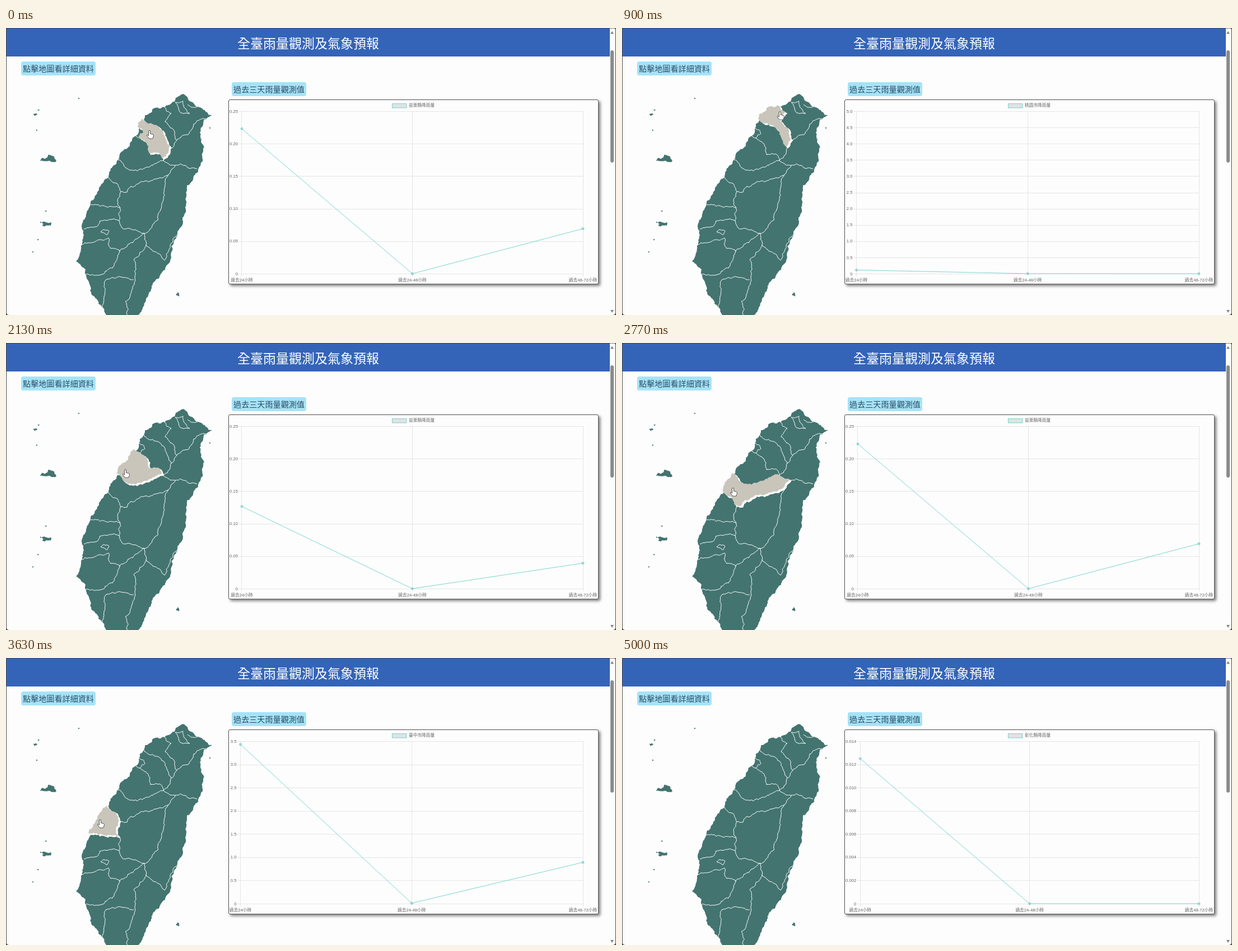
These frames come from a looping animation (1089 by 514 pixels, 5.03 s). An HTML page with a canvas:

```html
<!DOCTYPE html>
<html lang="zh-Hant">
<head>
<meta charset="utf-8">
<title>雨量觀測</title>
<style>
  html, body { margin: 0; width: 100%; height: 100%; overflow: hidden; background: #fdfdfd; }
  body { position: relative; font-family: "Noto Sans CJK TC", "Noto Sans CJK", sans-serif; font-weight: 300; }
  canvas, h1, .tag, .card, .thumb, .frame { position: absolute; box-sizing: border-box; margin: 0; }
  canvas { left: 0; top: 0; width: 1089px; height: 514px; }
  h1 { left: 1px; top: 0; width: 1077px; height: 51px; background: #3464b8; color: #fff;
       font-size: 23px; line-height: 52px; font-weight: 300; text-align: center; }
  .tag { width: 133px; height: 25px; border-radius: 4px; background: #a6e3f7; color: #2b4c66;
         font-size: 14.1px; line-height: 25px; text-align: center; white-space: nowrap; }
  .card { left: 396.5px; top: 128px; width: 661px; height: 331px; background: #fdfdfd;
          border: 1px solid #555; border-radius: 3px; box-shadow: 3px 3px 5px rgba(0, 0, 0, .5); }
  .thumb { left: 1079px; top: 40px; width: 6px; height: 201px; border-radius: 3px; background: #8b8b8b; }
  .frame { left: 0; top: 0; width: 1089px; height: 514px; border: 1px solid #4a4a4a; border-bottom: 0;
           border-top-color: rgba(50, 50, 60, .6); border-radius: 4px 4px 5px 5px; box-shadow: 0 0 0 6px #3a3a3a; }
</style>
</head>
<body>
<h1>全臺雨量觀測及氣象預報</h1>
<div class="tag" style="left:27px;top:60px">點擊地圖看詳細資料</div>
<div class="tag" style="left:403px;top:97px">過去三天雨量觀測值</div>
<div class="card"></div>
<div class="thumb"></div>
<canvas></canvas>
<div class="frame"></div>
<script>
const LOOP = 5030, WIDTH = 1089, HEIGHT = 514;
const GREEN = '#437470', TAN = '#c9c5ba', TEAL = '#7bd3ce', PAPER = '#fdfdfd';
const canvas = document.querySelector('canvas');
const ctx = canvas.getContext('2d');
const scale = window.devicePixelRatio || 1;
canvas.width = WIDTH * scale;
canvas.height = HEIGHT * scale;

// Key points of each shoreline and border; wobble() adds the fine detail
const arcs = {
  mainCoast: '283,142 294,136 303,125 316,118 330,132 345,142 369,157 353,165 346,187 354,213 351,235 336,264 323,282 322,300 315,342 306,371 288,424 264,455 236,514 220,540 196,530 172,500 150,470 142,433 125,418 138,374 136,350 150,317',
  changhuaCoast: '150,317 166,290 183,267',
  taichungCoast: '183,267 184,259 200,236',
  miaoliCoast: '200,236 207,221 223,204 231,193',
  cityCoast: '231,193 238,179',
  hsinchuCoast: '238,179 239,172 246,165',
  taoyuanCoast: '246,165 248,156 266,143 283,142',
  taoyuanEast: '283,142 295,153 284,168 298,181 305,201 295,215',
  taoyuanSouth: '246,165 267,176 286,195 295,215',
  hsinchuEast: '295,215 293,225 281,237',
  miaoliNorth: '281,237 275,226 258,227 257,214 239,197',
  cityEast: '239,197 248,189 238,179',
  citySouth: '231,193 239,197',
  taichungNorth: '200,236 215,251 234,256 262,246 281,237',
  taichungEast: '281,237 290,243 302,246 290,263',
  taichungSouth: '290,263 249,274 222,284 216,294 205,293',
  taichungWest: '183,267 199,279 205,293',
  changhuaEast: '205,293 199,310 204,322',
  changhuaSouth: '204,322 175,318 150,317',
  taipei: '302,133 312,152 328,153 316,131 302,133',
  keelung: '324,137 331,142 343,141',
  yilanNorth: '362,161 335,172 325,191 305,201',
  yilanSouth: '302,246 320,246 341,252',
  nantouEast: '290,263 282,290 276,325 271,344 247,368',
  nantouWest: '204,322 202,345 212,360 247,368',
  yunlinSouth: '139,360 161,356 167,346 202,345',
  chiayiCity: '169,365 175,361 184,364 181,370 169,365',
  chiayiSouth: '135,388 160,382 183,376 187,395 203,400 218,387 247,368',
  tainanSouth: '203,400 190,430 175,440 142,441',
  taitungWest: '247,368 250,388 228,415 229,457 213,490 218,520',
  taitungNorth: '250,388 283,416 292,395 306,371',
  pingtungNorth: '228,451 210,447 180,450 175,480 172,500',
};
for (const name in arcs) arcs[name] = arcs[name].split(' ').map(pair => pair.split(',').map(Number));

// Shapes are arcs joined end to end; a minus sign reverses one
const counties = {
  taoyuan: join('taoyuanCoast taoyuanEast -taoyuanSouth'),
  hsinchu: join('hsinchuCoast taoyuanSouth hsinchuEast miaoliNorth cityEast'),
  miaoli: join('miaoliCoast citySouth -miaoliNorth -taichungNorth'),
  taichung: join('taichungCoast taichungNorth taichungEast taichungSouth -taichungWest'),
  changhua: join('changhuaCoast taichungWest changhuaEast changhuaSouth'),
};
const land = join('mainCoast changhuaCoast taichungCoast miaoliCoast cityCoast hsinchuCoast taoyuanCoast');
const borders = Object.keys(arcs).filter(name => !name.endsWith('Coast')).map(join);

const islets = [islet(80, 234, 10, 6), islet(67, 236, 6, 3), islet(72, 351, 8, 4), islet(307, 477, 3, 3), islet(52, 155, 3, 2),
  ...'130,126 58,147 55,183 71,328 62,348 57,379 48,401 364,179'.split(' ').map(p => islet(...p.split(',').map(Number), 1.5, 1))];

const charts = [
  { start: -1000, name: '苗栗縣', values: [.223, 0, .0692] },
  { start: 895, name: '桃園市', values: [4.73, .035, 0] },
  { start: 1942, name: '苗栗縣', values: [.223, 0, .0692] },
  { start: 2900, name: '臺中市', values: [3.45, .01, .895] },
  { start: 3930, name: '彰化縣', values: [.0125, 0, 0] },
];
const dayLabels = ['過去24小時', '過去24-48小時', '過去48-72小時'];

const visits = [
  { time: 0, x: 256, y: 184, county: 'hsinchu' },
  { time: 880, x: 282, y: 150, county: 'taoyuan' },
  { time: 1570, x: 237, y: 216, county: 'miaoli' },
  { time: 2130, x: 213, y: 227, county: 'miaoli' },
  { time: 2770, x: 198, y: 260, county: 'taichung' },
  { time: 3630, x: 168, y: 290, county: 'changhua' },
  { time: 4300, x: 168, y: 290, county: 'changhua' },
  { time: 4700, x: 150, y: -20 },
];
const hand = new Path2D('M-1.5 9V1a1.5 1.5 0 0 1 3 0v4.3l4.6 1.1q1.6.5 1.4 2.1l-.8 3.5-1 2.2H-.3L-4.6 9q-.4-1.8 1.3-1.4z');

// Fractal wobble that is the same in both directions, so shared edges coincide
function wobble(path, a, b) {
  const dx = b[0] - a[0], dy = b[1] - a[1], length = Math.hypot(dx, dy);
  if (length > 3) {
    const noise = Math.sin((a[0] + b[0]) * 12.9 + (a[1] + b[1]) * 78.2) * 43758;
    const bend = (noise - Math.floor(noise) - .5) * Math.min(.36, 6 / length) * ((dx || dy) > 0 ? 1 : -1);
    const mid = [(a[0] + b[0]) / 2 - dy * bend, (a[1] + b[1]) / 2 + dx * bend];
    wobble(path, a, mid);
    wobble(path, mid, b);
  } else path.lineTo(...b);
}

function trace(points) {
  const path = new Path2D();
  path.moveTo(...points[0]);
  points.slice(1).forEach((point, i) => wobble(path, points[i], point));
  return path;
}

function join(names) {
  return trace(names.split(' ').flatMap(name =>
    name[0] === '-' ? [...arcs[name.slice(1)]].reverse() : arcs[name]));
}

function islet(x, y, rx, ry) {
  const corners = Array.from({ length: 10 }, (_, i) => {
    const angle = i * Math.PI / 5, reach = 1 + .35 * Math.sin(i * 4.1 + x);
    return [x + rx * reach * Math.cos(angle), y + ry * reach * Math.sin(angle)];
  });
  return trace([...corners, corners[0]]);
}

function fill(path, color) {
  ctx.fillStyle = color;
  ctx.fill(path);
}

function line(x1, y1, x2, y2) {
  ctx.beginPath();
  ctx.moveTo(x1, y1);
  ctx.lineTo(x2, y2);
  ctx.stroke();
}

function label(text, x, y, align) {
  ctx.textAlign = align;
  ctx.fillText(text, x, y);
}

function drawMap(hovered) {
  [land, ...islets].forEach(path => fill(path, GREEN));
  ctx.strokeStyle = '#fff';
  ctx.lineWidth = 1;
  borders.forEach(path => ctx.stroke(path));
  if (!hovered) return;
  fill(counties[hovered], PAPER);
  ctx.save();
  ctx.translate(-3, -2.5);
  fill(counties[hovered], TAN);
  ctx.restore();
}

// Round tick spacing: 1, 2, 5 or 10 times a power of ten, at most ten ticks
function tickStep(max) {
  const power = 10 ** Math.floor(Math.log10(max / 10));
  return [1, 2, 5, 10].find(n => n * power >= max / 10) * power;
}

function drawChart(t) {
  const { start, name, values } = charts.filter(chart => chart.start <= t).pop();
  const peak = Math.max(...values), step = tickStep(peak), ticks = Math.ceil(peak / step);
  const digits = -Math.floor(Math.log10(step) + 1e-9);
  const grown = 1 - (1 - Math.min(1, (t - start) / 1000)) ** 4;

  ctx.font = '7.7px "Liberation Sans", "Noto Sans CJK TC", "Noto Sans CJK", sans-serif';
  ctx.textBaseline = 'middle';
  ctx.lineWidth = 1;
  ctx.strokeStyle = '#e4e5e6';
  ctx.fillStyle = '#666';

  const top = 149, bottom = 440, right = 1030;
  const left = Math.max(418.5, 406 + ctx.measureText(step.toFixed(digits)).width);
  const xs = [left, (left + right) / 2, right];
  const ys = values.map(value => bottom - value * grown / (step * ticks) * (bottom - top));

  for (let i = 0; i <= ticks; i++) {
    const y = bottom - i / ticks * (bottom - top);
    line(left - 5, Math.round(y) + .5, right, Math.round(y) + .5);
    label(i ? (step * i).toFixed(digits) : '0', left - 7, y + .5, 'right');
  }
  xs.forEach((x, i) => {
    line(Math.floor(x) + .5, top, Math.floor(x) + .5, bottom + 5);
    label(dayLabels[i], x, 451.5, 'center');
  });
  label(name + '降雨量', 719, 138.5, 'left');

  ctx.strokeStyle = TEAL;
  ctx.fillStyle = '#e2e2e2';
  ctx.fillRect(689, 135, 26, 8);
  ctx.strokeRect(689.5, 135.5, 25.5, 7.5);
  ctx.beginPath();
  xs.forEach((x, i) => ctx.lineTo(x, ys[i]));
  ctx.stroke();
  ctx.fillStyle = 'rgba(130, 190, 185, .5)';
  xs.forEach((x, i) => {
    ctx.beginPath();
    ctx.arc(x, ys[i], 2, 0, 7);
    ctx.fill();
    ctx.stroke();
  });
}

function drawHand(x, y) {
  ctx.save();
  ctx.translate(x, y);
  fill(hand, '#fff');
  ctx.strokeStyle = '#444';
  ctx.lineWidth = .9;
  ctx.stroke(hand);
  ctx.restore();
}

function draw(now) {
  const t = now % LOOP;
  const next = visits.find(visit => visit.time > t) || visits[visits.length - 1];
  const last = visits.filter(visit => visit.time <= t).pop();
  const p = next === last ? 1 : (t - last.time) / (next.time - last.time);
  const eased = p * p * (3 - 2 * p);

  ctx.setTransform(scale, 0, 0, scale, 0, 0);
  ctx.clearRect(0, 0, WIDTH, HEIGHT);
  drawMap((p < .5 ? last : next).county);
  drawChart(t);
  fill(new Path2D('M1079 10.5l3-5 3 5zM1079 505l3 5 3-5z'), '#858585');
  drawHand(last.x + (next.x - last.x) * eased, last.y + (next.y - last.y) * eased);
  requestAnimationFrame(draw);
}
requestAnimationFrame(draw);
</script>
</body>
</html>
```
